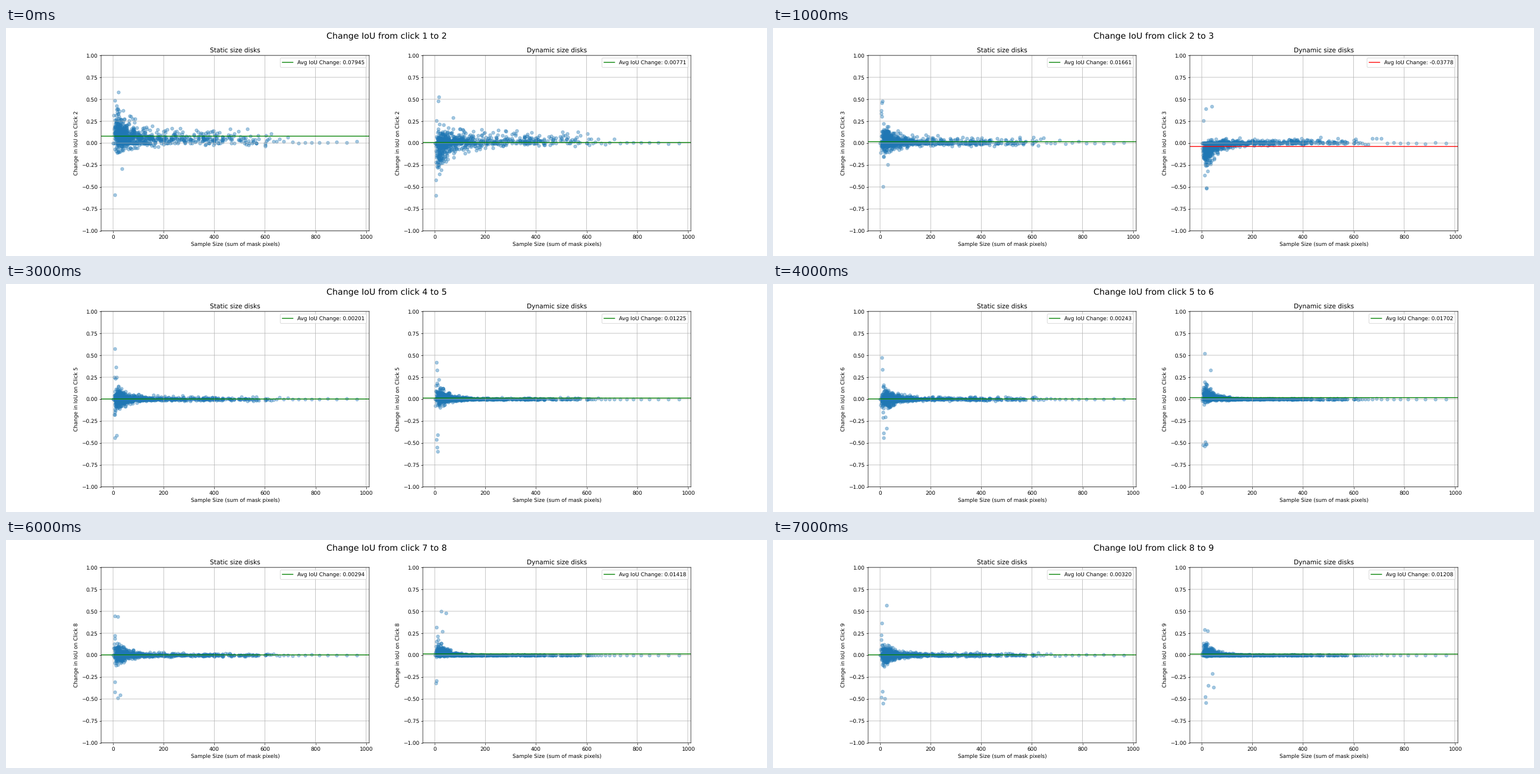
A matplotlib script for the animation above (8000 ms loop, 1280x384 px).

```python
import numpy as np
import matplotlib.pyplot as plt
from matplotlib.animation import FuncAnimation

plt.rcParams["path.snap"] = False
plt.rcParams["text.hinting"] = "no_hinting"

STEPS = 8
STATIC_AVG = [0.07945, 0.01661, 0.00972, 0.00201, 0.00243, 0.00268, 0.00294, 0.00320]
DYNAMIC_AVG = [0.00771, -0.03778, -0.00481, 0.01225, 0.01702, 0.01633, 0.01418, 0.01208]


def sample_sizes():
    """Many small masks, a thinning middle and a few large ones."""
    rng = np.random.default_rng(4)
    small = 4 + rng.gamma(1.7, 30, 560)
    middle = rng.uniform(120, 410, 200)
    large = rng.uniform(410, 585, 58)
    tail = 601 + 363 * np.linspace(0, 1, 22) ** 2.5
    return np.concatenate([[1, 2, 3], small, middle, large, tail]).round()


SIZES = sample_sizes()


def cloud(avg, step, seed, down, far_floor, far_shift, zero_share):
    """Skewed noise that narrows as the sample size grows, plus a few stray dots."""
    rng = np.random.default_rng(seed + step)
    near = np.exp(-SIZES / (42 + 25 * 0.3 ** step))
    shift = 2.5 * (avg - far_shift)
    up = 0.055 + 0.3 * shift
    far = far_floor + 0.038 * 0.45 ** step

    noise = np.clip(rng.standard_normal(SIZES.size), -2.5, 2.5)
    scale = np.where(noise > 0, up * near + far, down * near + 0.55 * far)
    y = shift * near + far_shift + np.sign(noise) * np.abs(noise) ** 1.2 * scale
    y[SIZES > 715] *= 0.25
    y[(rng.random(SIZES.size) < zero_share) | (SIZES < 3)] = 0

    stray_x = 4 + rng.exponential(12, 7)
    stray_y = rng.choice([-1, 1], 7) * rng.uniform(0.2, 0.6, 7)
    return np.column_stack([np.append(SIZES, stray_x), np.append(y, stray_y)])


def static_cloud(avg, step):
    return cloud(avg, step, seed=20, down=0.06, far_floor=0.010,
                 far_shift=0.045 * 0.1 ** step, zero_share=0.08)


def dynamic_cloud(avg, step):
    return cloud(avg, step, seed=60, down=0.15 * 0.72 ** step, far_floor=0.002,
                 far_shift=0.03 * 0.3 ** step, zero_share=0.15)


class Panel:
    def __init__(self, ax, title, averages, make_cloud):
        self.ax = ax
        self.averages = averages
        self.clouds = [make_cloud(avg, step) for step, avg in enumerate(averages)]
        self.scatter = ax.scatter([], [], alpha=0.4, color="tab:blue")
        self.line = ax.axhline(0)
        ax.set(title=title, xlim=(-47.15, 1012.15), ylim=(-1, 1),
               xlabel="Sample Size (sum of mask pixels)")
        ax.grid()

    def show(self, step):
        avg = self.averages[step]
        self.scatter.set_offsets(self.clouds[step])
        self.line.set_ydata([avg, avg])
        self.line.set_color("green" if avg > 0 else "red")
        self.line.set_label(f"Avg IoU Change: {avg:.5f}")
        self.ax.legend(loc="upper right")
        self.ax.set_ylabel(f"Change in IoU on Click {step + 2}")


fig, (left, right) = plt.subplots(1, 2, figsize=(20, 6), dpi=64)
panels = [
    Panel(left, "Static size disks", STATIC_AVG, static_cloud),
    Panel(right, "Dynamic size disks", DYNAMIC_AVG, dynamic_cloud),
]


def update(step):
    fig.suptitle(f"Change IoU from click {step + 1} to {step + 2}", fontsize=16)
    for panel in panels:
        panel.show(step)


anim = FuncAnimation(fig, update, frames=STEPS, interval=1000, repeat=True, repeat_delay=0)
plt.show()
```
